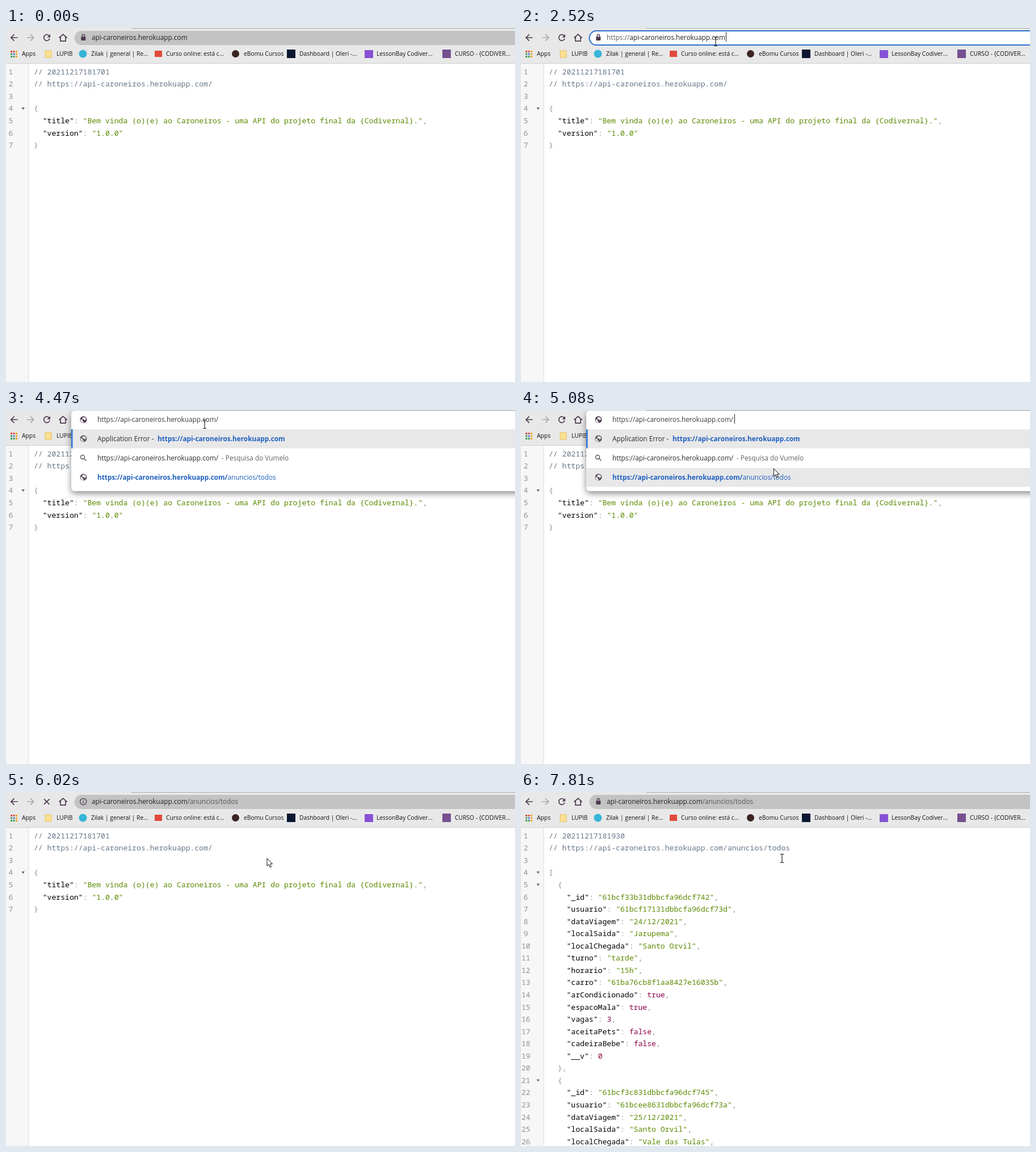
Recreate the animation shown at these times as an HTML page. Size 897 px wide and 624 px high, loop 8 s.

```html
<!DOCTYPE html>
<html lang="pt-BR">
<head>
<meta charset="utf-8">
<title>API no navegador</title>
<style>
  html, body { margin: 0; width: 100%; height: 100%; overflow: hidden; background: #fff; }
  svg { display: block; width: 100vw; height: 100vh; }
  text { font-family: "Open Sans", "Noto Sans", sans-serif; white-space: pre; }
  .ui { font-size: 11.8px; }
  .mark { font-size: 10.3px; fill: #111; }
  .code { font-family: "Noto Sans Mono", "DejaVu Sans Mono", monospace; font-size: 13.13px; }
  .b { font-weight: 700; }
  .line { fill: none; stroke-width: 1.7; }
</style>
</head>
<body>
<svg id="stage" viewBox="0 0 897 624"></svg>
<script>
const stage = document.getElementById('stage');
const LOOP = 8000, INK = '#4d3a50', GREY = '#606060', LINK = '#2060c0';
const HOST = 'api-caroneiros.herokuapp.com', URL_ = 'https://' + HOST, PATH = '/anuncios/todos';

const welcome = `// 20211217181701
// ${URL_}/

{
  "title": "Bem vinda (o)(e) ao Caroneiros - uma API do projeto final da {Codivernal}.",
  "version": "1.0.0"
}`;

const list = `// 20211217181930
// ${URL_}${PATH}

[
  {
    "_id": "61bcf33b31dbbcfa96dcf742",
    "usuario": "61bcf17131dbbcfa96dcf73d",
    "dataViagem": "24/12/2021",
    "localSaida": "Jarupema",
    "localChegada": "Santo Orvil",
    "turno": "tarde",
    "horario": "15h",
    "carro": "61ba76cb8f1aa8427e16035b",
    "arCondicionado": true,
    "espacoMala": true,
    "vagas": 3,
    "aceitaPets": false,
    "cadeiraBebe": false,
    "__v": 0
  },
  {
    "_id": "61bcf3c831dbbcfa96dcf745",
    "usuario": "61bcee8631dbbcfa96dcf73a",
    "dataViagem": "25/12/2021",
    "localSaida": "Santo Orvil",
    "localChegada": "Vale das Tulas",`;

// Drawing helpers
const rect = (x, y, w, h, fill, more = '') =>
  `<rect x="${x}" y="${y}" width="${w}" height="${h}" fill="${fill}" ${more}/>`;
const text = (x, y, s, cls = 'ui', fill = '', more = '') =>
  `<text x="${x}" y="${y}" class="${cls}" ${fill && `fill="${fill}"`} ${more}>${s}</text>`;
const span = (s, fill) => `<tspan fill="${fill}">${s}</tspan>`;
const line = (d, color = INK, more = '') => `<path class="line" d="${d}" stroke="${color}" ${more}/>`;
const dot = (x, y, r, fill) => `<circle cx="${x}" cy="${y}" r="${r}" fill="${fill}"/>`;

const lock = rect(132.3, 15.3, 8, 6.7, INK, 'rx="1"') + line('M134 15.5v-1.7a2.3 2.3 0 0 1 4.6 0v1.7', INK, 'style="stroke-width:1.3"');
const info = line('M130.6 17a5.6 5.6 0 1 0 11.2 0a5.6 5.6 0 1 0-11.2 0M136.2 16v4M136.2 13.5v1.5', INK, 'style="stroke-width:1.3"');
const globe = (y, color, bg) => dot(136.5, y, 6, color) +
  `<path fill="${bg}" d="M132 ${y - 1}l3 2v2l2 1v1.5l-3-.5-2.5-3zM136 ${y - 4.5}l4 1 1 3-2.5 2-1-2h-3v-2z"/>`;
const glass = (y, color) => line(`M131.5 ${y - 1.5}a3.5 3.5 0 1 0 7 0a3.5 3.5 0 1 0-7 0M137.6 ${y + 1}l4 4`, color, 'style="stroke-width:1.5"');

const highlight = s => s.startsWith('//') ? span(s, '#67778a') :
  s.replace(/("[^"]*")(?=:)|("[^"]*")|(\b(?:true|false|\d+)\b)|([{}[\]:,]+)/g,
    (m, key, str, value) => span(m, key ? '#000' : str ? '#5a8a00' : value ? '#8a004c' : '#909090'));

function page(source, folds) {
  const rows = source.split('\n').map((s, i) => {
    const y = 81.7 + 21.56 * i;
    const fold = folds && /[[{]$/.test(s) ? `<path fill="#666" d="M27.5 ${y - 6.5}h5.4l-2.7 4.4z"/>` : '';
    return text(8.5, y, i + 1, 'code', '#909090', 'text-anchor="middle"') + fold + text(49, y, highlight(s), 'code');
  });
  return rect(0, 63, 40, 561, '#f7f7f7') + rect(39.5, 63, 1, 561, '#ddd') + rows.join('');
}

const marks = [
  [28, 'Apps'], [89, 'LUPIB'], [150, 'Zilak | general | Re...'], [282, 'Curso online: está c...'],
  [419, 'eBomu Cursos'], [517, 'Dashboard | Oleri -...'], [653, 'LessonBay Codiver...'], [791, 'CURSO - {CODIVER...']
].map(([x, s]) => text(x, 49.3, s, 'mark')).join('');

const appColors = ['#d9483b', '#d9483b', '#e8a820', '#3c9a55', '#3f7de0', '#e8a820', '#3c9a55', '#3c9a55', '#e8a820'];
const apps = appColors.map((c, i) => rect(8 + i % 3 * 4.5, 40 + (i / 3 | 0) * 4.5, 3, 3, c)).join('');

const chrome = rect(0, 0, 897, 62, '#e8e8e8') + rect(221, 0, 676, 1, '#a8a8a8') + rect(0, 62, 897, 1, '#cfcfcf') +
  line('M20.5 17H9M14.5 11.3L8.8 17l5.7 5.7') +
  line('M37 17h11.5M43 11.3l5.7 5.7-5.7 5.7', '#a9a9a9') +
  line('M93.5 17.5l7-6.3 7 6.3M96 16v7.2h9V16') +
  apps + rect(69, 40, 11, 12, '#fbe093', 'stroke="#e5c25c"') +
  dot(135.5, 45.5, 7, '#36b5d8') + rect(262, 40, 13, 11, '#e04a3c') + dot(404.5, 45.5, 6.5, '#3a2320') +
  rect(495, 38, 15, 15, '#0b1730') + rect(632, 39, 15, 14, '#8752d6') + rect(769, 38, 15, 15, '#76508f') + marks;

const reload = line('M76.6 14.4A5.3 5.3 0 1 0 77 18.6') + `<path fill="${INK}" d="M78 11v5.6h-5.6z"/>`;
const stop = line('M67 12.3l9.6 9.6M76.6 12.3L67 21.9');

const between = (t, a, b) => t >= a && t < b;

// Pointer path: time, x, y
const path = [[300, 797, 551], [1040, 356, 40], [1320, 343, 22], [2000, 343, 22], [2520, 343, 24],
  [4400, 343, 24], [4470, 350, 25], [5230, 456, 112], [5420, 460, 117], [LOOP, 460, 117]];
function pointer(t) {
  const i = path.findIndex(p => p[0] > t);
  const [t0, x0, y0] = path[i - 1], [t1, x1, y1] = path[i];
  const k = (t - t0) / (t1 - t0), e = k * k * (3 - 2 * k);
  return [x0 + (x1 - x0) * e, y0 + (y1 - y0) * e];
}
function drawPointer(x, y, t) {
  const beam = t >= 7810 || t < 5750 && (y < 32 || t < 1320 && y > 63);
  const shape = beam
    ? `<path d="M-3-7.5h2l1 1 1-1h2M-3 7.5h2l1-1 1 1h2M0-6.5v13" fill="none" stroke="#111" stroke-width="1.1"/>`
    : `<path d="M0 0V13.5L3.1 10.6 5.3 15.8 7.6 14.8 5.4 9.8H9.6Z" fill="#fff" stroke="#111"/>`;
  return `<g transform="translate(${x.toFixed(1)} ${y.toFixed(1)})">${shape}</g>`;
}

function addressBar(t) {
  const focus = between(t, 1580, 5960);
  const box = `<rect x="120.5" y="5" width="800" height="25" rx="12.5" ` +
    (focus ? 'fill="#fff" stroke="#2b70d0" stroke-width="2"/>' : 'fill="#c3c3c3"/>');
  const icon = between(t, 5960, 6620) ? info : lock;
  if (between(t, 1730, 2520)) return box + icon + rect(151, 7, 169.5, 18, '#0078d7') + text(151, 21.3, HOST, 'ui', '#fff');
  const content = between(t, 2520, 5960)
    ? span('https://', GREY) + span(HOST + (t >= 3600 ? '/' : ''), '#222')
    : span(HOST, '#222') + (t >= 5960 ? span(PATH, '#585858') : '');
  return box + icon + text(151, 21.3, content);
}

function popup(t, y) {
  const picked = t >= 5750;
  const row = (i, on, active) => on ? rect(115, 34 + 34 * i, 782, 33.5, '#e8e8e8') +
    (active ? rect(115, 34 + 34 * i, 2.5, 33.5, '#2b74d4') : '') : '';
  const hover = i => t > 4470 && between(y, 34 + 34 * i, 68 + 34 * i);
  return `<rect x="115" y="1" width="800" height="142" rx="6" fill="#fff" style="filter:drop-shadow(0 4px 6px #0007)"/>` +
    row(0, !picked || hover(0), !picked) + row(1, hover(1)) + row(2, picked || hover(2), picked) +
    globe(17, INK, '#fff') + text(161, 21.3, URL_ + (picked ? PATH : '/'), 'ui', '#3c3c3c') +
    globe(50.5, '#5c5c60', '#e8e8e8') + text(161, 54.7, 'Application Error -', 'ui', '#2b2b2b') +
    text(267, 54.7, URL_, 'ui b', LINK) +
    glass(84.5, '#5c5c60') + text(161, 88.7, URL_ + '/', 'ui', '#2b2b2b') + text(380, 88.7, '- Pesquisa do Vumelo', 'ui', GREY) +
    globe(118.5, '#5c5060', '#fff') +
    text(161, 122.7, `<tspan class="b">${URL_}/</tspan>anuncios/todos`, 'ui', LINK);
}

function scene(t) {
  const [x, y] = t < 300 ? [0, 0] : pointer(t);
  const open = between(t, 3670, 5960);
  const body = t < 7280 ? page(welcome, true) : t < 7480 ? '' : page(list, t >= 7680);
  const caret = between(t, 2520, 3070) || between(t, 3600, 4200) || between(t, 4730, 5280);
  const caretX = open ? 376 : t >= 3600 ? 366 : 361;
  return rect(0, 0, 897, 624, '#fff') + body + chrome + (between(t, 5960, 7680) ? stop : reload) +
    (open ? popup(t, y) : addressBar(t)) + (caret ? rect(caretX, 7, 1, 17, '#222') : '') +
    (t < 300 ? '' : drawPointer(x, y, t));
}

let shown = '';
function frame() {
  const next = scene(performance.now() % LOOP);
  if (next !== shown) stage.innerHTML = shown = next;
  requestAnimationFrame(frame);
}
frame();
</script>
</body>
</html>
```
